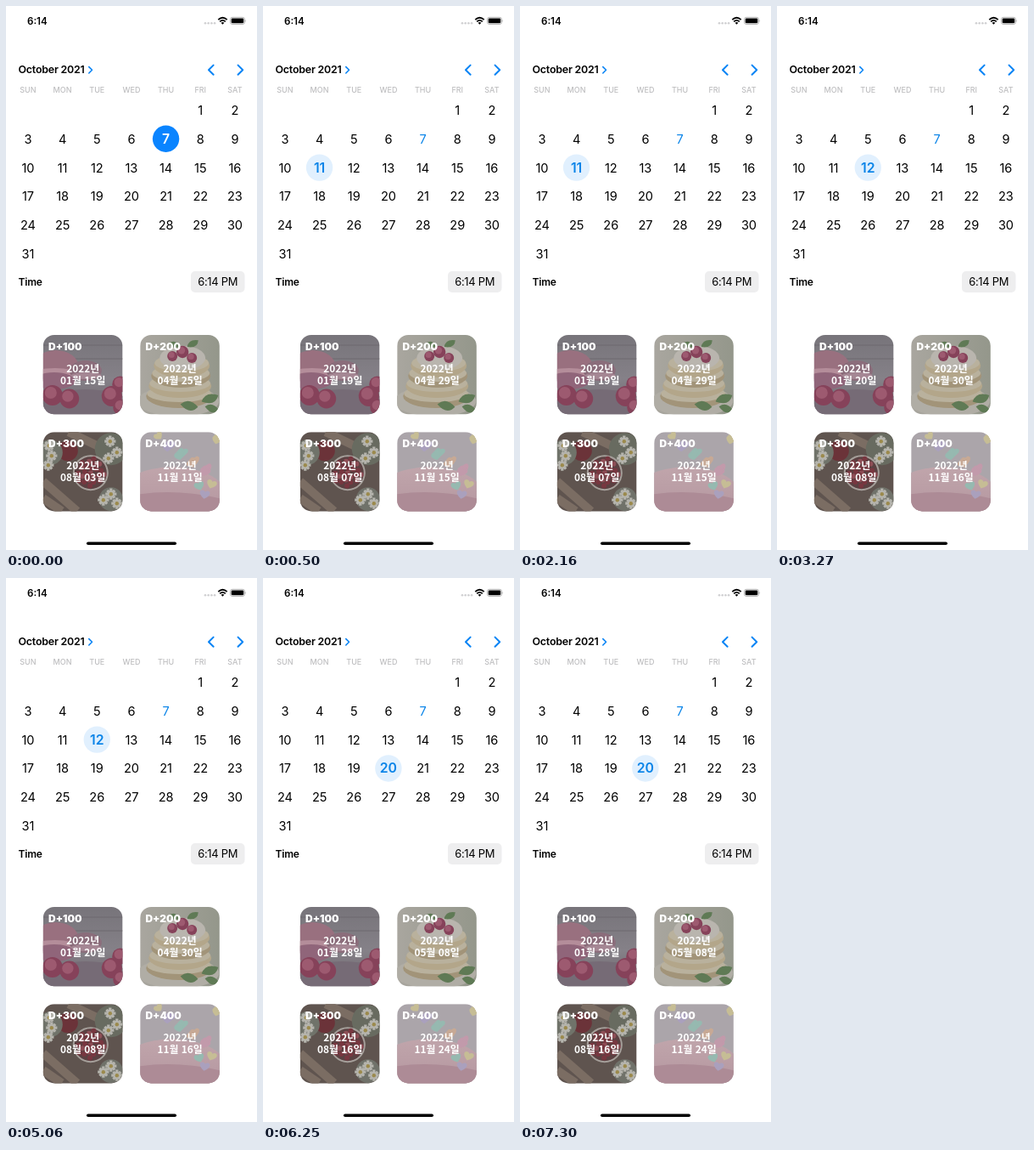
An HTML page for the animation above (8 s loop, 296x640 px).

```html
<!DOCTYPE html>
<html lang="ko">
<head>
<meta charset="utf-8">
<style>
html, body { margin: 0; width: 100%; height: 100%; overflow: hidden; background: #fff; }
svg { display: block; width: 296px; height: 640px; font-family: Inter, sans-serif; }
.card text { fill: #fff; font-family: "Noto Sans CJK KR", "Noto Sans CJK", sans-serif; font-weight: 700; font-size: 11.9px; }
.card .tag { font: 900 12px Inter, sans-serif; }
.chevron { fill: none; stroke: #0a84f5; stroke-linecap: round; stroke-linejoin: round; }
</style>
</head>
<body>
<svg id="stage" viewBox="0 0 296 640">
  <defs>
    <clipPath id="round"><rect width="93.6" height="93.2" rx="13"/></clipPath>
    <linearGradient id="wood" x2="0" y2="1"><stop stop-color="#77747a"/><stop offset=".55" stop-color="#858188"/><stop offset="1" stop-color="#6c626b"/></linearGradient>
    <linearGradient id="cream"><stop stop-color="#a9a69f"/><stop offset="1" stop-color="#94978b"/></linearGradient>
    <linearGradient id="frosting" x2="0" y2="1"><stop stop-color="#c0a5ab"/><stop offset="1" stop-color="#b1929c"/></linearGradient>
    <g id="berry"><circle r="12" fill="#86425a"/><circle cx="-2" cy="-3" r="7" fill="#9d5a70"/></g>
    <g id="daisy"><path d="M-6 0H6M0-6V6M-4-4 4 4M4-4-4 4" stroke="#b5b4ad" stroke-width="3"/><circle r="2" fill="#9b8a4d"/></g>
    <path id="leaf" d="M-9 0Q-2-10 10-2Q4 9-9 0" fill="#5f7a55"/>
    <path id="heart" d="M0 6C-15-3-5-11 0-5C5-11 15-3 0 6"/>
  </defs>
  <g id="status">
    <g fill="#d0d0d2"><circle cx="235" cy="20.3" r="1.3"/><circle cx="238.7" cy="20.3" r="1.3"/><circle cx="242.4" cy="20.3" r="1.3"/><circle cx="246.1" cy="20.3" r="1.3"/></g>
    <path fill="none" stroke="#000" stroke-width="1.8" d="M250.3 16.2Q255.5 11.4 260.7 16.2M252.2 18.4Q255.5 15.4 258.8 18.4"/>
    <path d="M253.6 19.7Q255.5 18.2 257.4 19.7L255.5 21.7Z"/>
    <rect x="264.5" y="13.3" width="17" height="8.2" rx="2.4" fill="none" stroke="#a5a5a5" stroke-width=".8"/>
    <rect x="265.7" y="14.5" width="14.6" height="5.8" rx="1.3"/>
    <path d="M282.5 16v3q1.4-1.5 0-3" fill="#a5a5a5"/>
  </g>
  <path class="chevron" stroke-width="1.6" d="M97.8 71.6 101.5 75.3 97.8 79"/>
  <path class="chevron" stroke-width="2" d="M244.6 69.6 239 75.2 244.6 80.8M273.6 69.6 279.2 75.2 273.6 80.8"/>
  <rect x="218" y="312" width="63.5" height="25" rx="5" fill="#eeeeef"/>
  <rect x="95" y="630.4" width="106" height="3.6" rx="1.8"/>
</svg>
<script>
const NS = 'http://www.w3.org/2000/svg', stage = document.getElementById('stage');

function add(tag, attrs, parent = stage) {
  const node = document.createElementNS(NS, tag);
  for (const key in attrs) node.setAttribute(key, attrs[key]);
  return parent.appendChild(node);
}
function label(text, x, y, size, weight = 400, attrs = {}) {
  const node = add('text', { x, y, 'font-size': size, 'font-weight': weight, ...attrs });
  node.textContent = text;
  return node;
}
const disc = (x, y, r, fill) => `<circle cx="${x}" cy="${y}" r="${r}" fill="${fill}"/>`;
const oval = (x, y, rx, ry, fill) => `<ellipse cx="${x}" cy="${y}" rx="${rx}" ry="${ry}" fill="${fill}"/>`;
const stamp = (id, x, y, scale = 1, turn = 0, fill = '') =>
  `<use href="#${id}" transform="translate(${x} ${y}) rotate(${turn}) scale(${scale})" fill="${fill}"/>`;
const base = fill => `<rect width="94" height="94" fill="${fill}"/>`;

// Simple dimmed desserts, each in a square of about 94 by 94.
function macarons() {
  return base('url(#wood)') + '<path d="M0 12H94M0 28H94" stroke="#6c686f"/>' +
    oval(50, 84, 55, 20, '#766b76') + oval(15, 38, 27, 20, '#99707f') +
    oval(14, 46, 26, 7, '#b48d9a') + oval(13, 54, 25, 10, '#90657a') +
    oval(50, 42, 19, 12, '#8b6d7b') + oval(51, 48, 18, 4, '#a58794') +
    stamp('berry', 11, 71) + stamp('berry', 31, 75, .95) +
    stamp('berry', 91, 58, .8) + stamp('berry', 81, 72) + stamp('berry', 92, 85, .8);
}
function pancakes() {
  return base('url(#cream)') + oval(45, 78, 48, 18, '#b0ada5') +
    [72, 60, 48, 36].map((y, i) => oval(46 + i, y, 39 - i * 2, 14, i % 2 ? '#b3a68a' : '#a29479') +
      oval(46 + i, y - 3, 38 - i * 2, 10, '#b9b19d')).join('') +
    oval(50, 27, 27, 14, '#b9b5ae') + stamp('berry', 38, 25, .5) + stamp('berry', 50, 20, .6) +
    stamp('berry', 61, 27, .5) + stamp('leaf', 62, 11, .8, -25) + stamp('leaf', 41, 11, .7, 200) +
    stamp('leaf', 57, 84, 1.1, 15) + stamp('leaf', 82, 76, 1.1, -15) + stamp('leaf', 84, 87, .9, 20);
}
function cherries() {
  let art = base('#5f544f') +
    '<path d="M0 58 40 93M0 78 22 93M30 0 93 30" stroke="#7b6d63" stroke-width="10"/>' +
    disc(29, 22, 12, '#6b3339') + disc(80, 20, 19, '#686b60') + disc(8, 24, 15, '#70736a') +
    disc(80, 79, 14, '#70726a') + disc(56, 48, 21, '#a59f9a') + disc(56, 48, 19, '#5b4142');
  for (let i = 0; i < 24; i++) {
    const r = 3.5 * Math.sqrt(i), a = i * 2.4;
    art += disc(56 + r * Math.cos(a), 48 + r * Math.sin(a), 3, i % 3 ? '#783740' : '#8e4e56');
  }
  return art + [[7, 16], [10, 28], [6, 39], [79, 11], [87, 24], [77, 31], [80, 73], [71, 80], [87, 84]]
    .map(p => stamp('daisy', ...p, 1.1)).join('');
}
function cake() {
  const colors = ['#c6bd95', '#96b9b0', '#c29aab', '#aaa0bd', '#c7a995'];
  let art = base('#aba5aa') + oval(38, 77, 65, 36, 'url(#frosting)') +
    '<path d="M0 73Q45 67 94 78V94H0Z" fill="#ad8b96"/>';
  for (let i = 0; i < 28; i++)
    art += stamp('heart', 22 + i * 29 % 73, 5 + i * 19 % 47, .68, i * 47 % 80 - 40, colors[i % 5]);
  return art + stamp('heart', 70, 64, .75, -20, colors[1]) + stamp('heart', 84, 62, .75, 20, colors[0]) +
    stamp('heart', 76, 74, .75, 10, colors[3]);
}

label('6:14', 25, 21.5, 11.6, 600);
label('October 2021', 14.5, 79.3, 12.4, 600, { 'letter-spacing': -.2 });
label('Time', 14.5, 328.8, 12, 600, { 'letter-spacing': -.2 });
label('6:14 PM', 249.7, 329, 13, 400, { 'text-anchor': 'middle', 'letter-spacing': -.3 });

const column = i => 25.9 + i * 40.67;
['SUN', 'MON', 'TUE', 'WED', 'THU', 'FRI', 'SAT'].forEach((name, i) =>
  label(name, column(i), 102.2, 9, 500, { 'text-anchor': 'middle', fill: '#bfbfc1' }));

const marker = add('circle', { r: 15.7 });
const days = Array.from({ length: 31 }, (_, i) => {
  const x = column((i + 5) % 7), y = 122.6 + Math.floor((i + 5) / 7) * 33.85;
  const node = label(i + 1, x, y + 5.2, 14.6, 400, { 'text-anchor': 'middle', 'letter-spacing': -.1 });
  return { x, y, node };
});

const cards = [macarons, pancakes, cherries, cake].map((draw, i) => {
  const group = add('g', { class: 'card', transform: `translate(${43.8 + i % 2 * 114.4} ${387 + (i >> 1) * 114.2})` });
  add('g', { 'clip-path': 'url(#round)' }, group).innerHTML = draw();
  const offset = (i + 1) * 100;
  group.append(label('D+' + offset, 6.2, 17.5, 12, 900, { class: 'tag' }));
  const [year, date] = [43.5, 57.8].map(y => label('', 46.9, y, 12, 700, { 'text-anchor': 'middle' }));
  group.append(year, date);
  return { offset, year, date };
});

const TODAY = 7;
const two = n => String(n).padStart(2, '0');
let shown;

function select(day) {
  if (day === shown) return;
  shown = day;
  const { x, y } = days[day - 1];
  marker.setAttribute('cx', x);
  marker.setAttribute('cy', y - .2);
  marker.setAttribute('fill', day === TODAY ? '#0a84ff' : '#e1f0fe');
  days.forEach(({ node }, i) => {
    const picked = i + 1 === day, today = i + 1 === TODAY;
    node.setAttribute('fill', picked && today ? '#fff' : picked || today ? '#0a84e8' : '#000');
    node.setAttribute('font-weight', picked ? 600 : 400);
    node.setAttribute('font-size', picked ? 15.8 : 14.6);
  });
  for (const { offset, year, date } of cards) {
    const d = new Date(2021, 9, day + offset);
    year.textContent = d.getFullYear() + '년';
    date.textContent = `${two(d.getMonth() + 1)}월 ${two(d.getDate())}일`;
  }
}

function tick() {
  const t = performance.now() % 8000;
  select(t < 500 ? TODAY : t < 3270 ? 11 : t < 6250 ? 12 : 20);
  requestAnimationFrame(tick);
}
tick();
</script>
</body>
</html>
```
